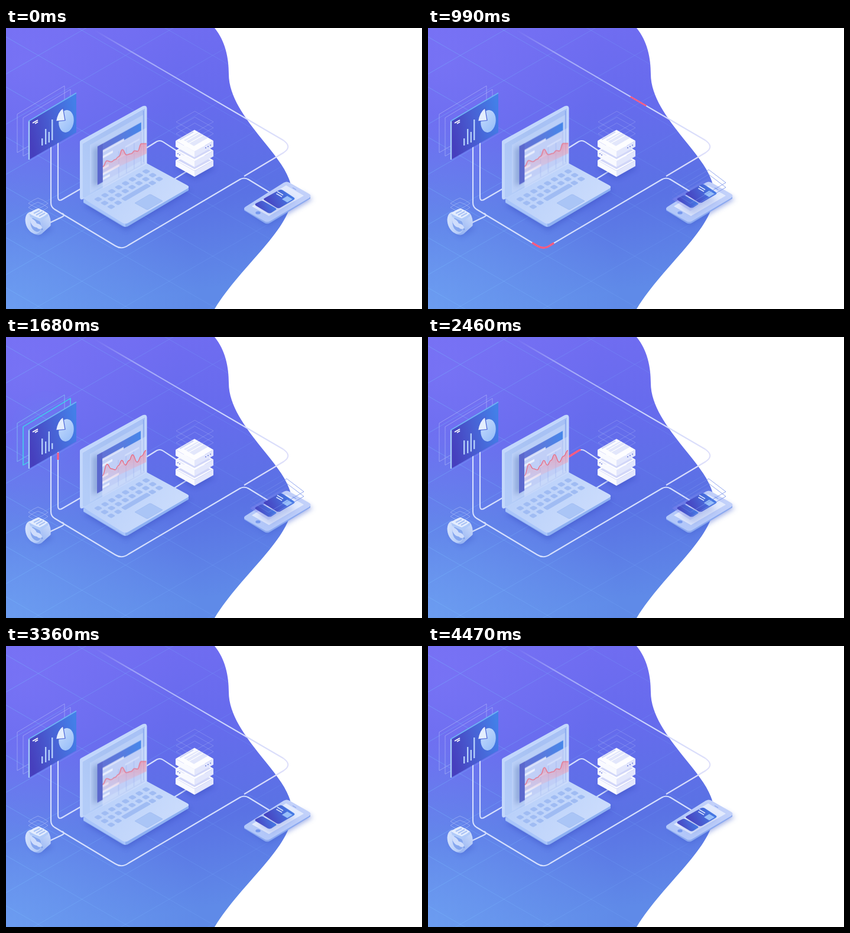
An HTML page for the animation above (4.5 s loop, 704 by 476 pixels).

```html
<!DOCTYPE html>
<html lang="en">
<head>
<meta charset="utf-8">
<title>Connected devices</title>
<style>
html, body { margin: 0; width: 100%; height: 100%; overflow: hidden; background: #fff; }
svg { display: block; width: 704px; height: 476px; }
.wire { fill: none; stroke: #d6e0fd; stroke-width: 2.1; }
.pulse { fill: none; stroke: #fb5b82; stroke-width: 3.4; }
.ghost { fill: none; stroke: #cfdcff; stroke-width: .9; stroke-opacity: .45; }
.cyan { fill: none; stroke: #2fdfe8; stroke-width: 1.3; }
.pulse, .lit, .lift, .rise, .bar, .float { animation: 4.5s linear infinite; }

.main { stroke-dasharray: 41 2000; animation-name: main; }
@keyframes main { 0%, 10.18% { stroke-dashoffset: 41; } 31.64%, 100% { stroke-dashoffset: -523; } }
.far { stroke-width: 2.6; animation-name: far; }
@keyframes far {
  0%, 13.8% { stroke-dasharray: 0 2000; stroke-dashoffset: 0; opacity: 0; }
  14% { opacity: 1; }
  15.33% { stroke-dasharray: 18 2000; stroke-dashoffset: -9; }
  24% { stroke-dasharray: 35 2000; stroke-dashoffset: -285; opacity: 1; }
  28% { stroke-dasharray: 34 2000; stroke-dashoffset: -319; opacity: .6; }
  32%, 100% { stroke-dasharray: 30 2000; stroke-dashoffset: -345; opacity: 0; }
}
.down { stroke-dasharray: 40 2000; animation-name: down; }
@keyframes down { 0%, 36.9% { stroke-dashoffset: 40; } 43.7%, 100% { stroke-dashoffset: -139; } }
.serve { stroke-dasharray: 40 2000; animation-name: serve; }
@keyframes serve { 0%, 53.8% { stroke-dashoffset: 40; } 57.8%, 100% { stroke-dashoffset: -66; } }

.early { animation-name: early; }
@keyframes early { 0%, 23.5% { opacity: 0; } 27.5%, 29% { opacity: 1; } 35.5%, 100% { opacity: 0; } }
.near { animation-name: near; }
@keyframes near { 0%, 32% { opacity: 0; } 35%, 37% { opacity: 1; } 44%, 100% { opacity: 0; } }
.halo { animation-name: halo; }
@keyframes halo { 0%, 36.5% { opacity: 0; } 41%, 43% { opacity: 1; } 48%, 100% { opacity: 0; } }
.late { animation-name: late; }
@keyframes late { 0%, 56% { opacity: 0; } 60%, 62% { opacity: 1; } 69%, 100% { opacity: 0; } }

.lift { animation-name: lift; animation-timing-function: ease-in-out; }
@keyframes lift {
  0%, .7% { transform: none; }
  20%, 60% { transform: translateY(-9px); }
  88%, 100% { transform: none; }
}
.rise { animation-name: rise; }
@keyframes rise {
  0%, 5% { opacity: 0; transform: translateY(18px); }
  15.33% { opacity: 1; transform: translateY(4px); }
  22%, 60% { opacity: 1; transform: none; }
  74%, 100% { opacity: 0; transform: translateY(16px); }
}
.bar { fill: #b4d0fb; transform-box: fill-box; transform-origin: bottom; animation-name: bar; animation-timing-function: ease-in-out; }
@keyframes bar { 0%, 29% { transform: none; } 37%, 48.5% { transform: scaleY(var(--s)); } 68%, 100% { transform: none; } }
.float { animation-name: float; animation-timing-function: ease-in-out; }
@keyframes float { 0%, 100% { transform: translate(.8px, .8px); } 46% { transform: none; } }
</style>
</head>
<body>
<svg viewBox="0 0 704 476" xmlns="http://www.w3.org/2000/svg">
<defs>
  <linearGradient id="sky" x1=".1" y1="0" x2=".25" y2="1">
    <stop stop-color="#726df2"/><stop offset=".35" stop-color="#666bed"/><stop offset=".68" stop-color="#5a72e4"/><stop offset="1" stop-color="#5f8ae8"/>
  </linearGradient>
  <radialGradient id="sea" gradientUnits="userSpaceOnUse" cx="0" cy="476" r="330">
    <stop stop-color="#6fa2f3" stop-opacity=".8"/><stop offset="1" stop-color="#6fa2f3" stop-opacity="0"/>
  </radialGradient>
  <radialGradient id="dusk" gradientUnits="userSpaceOnUse" cx="30" cy="60" r="260">
    <stop stop-color="#7f78f8" stop-opacity=".5"/><stop offset="1" stop-color="#7f78f8" stop-opacity="0"/>
  </radialGradient>
  <radialGradient id="glow">
    <stop stop-color="#1fdfe2" stop-opacity=".55"/><stop offset=".5" stop-color="#2fdce6" stop-opacity=".22"/><stop offset="1" stop-color="#40e0e8" stop-opacity="0"/>
  </radialGradient>
  <linearGradient id="gridInk" gradientUnits="userSpaceOnUse" x1="0" y1="0" x2="480" y2="0">
    <stop stop-color="#78bcff" stop-opacity=".4"/><stop offset="1" stop-color="#78a8ff" stop-opacity=".14"/>
  </linearGradient>
  <linearGradient id="trail" gradientUnits="userSpaceOnUse" x1="150" y1="0" x2="478" y2="0">
    <stop stop-color="#c9d4ff" stop-opacity="0"/><stop offset=".2" stop-color="#c9d4ff" stop-opacity=".5"/><stop offset=".7" stop-color="#d0d9fd"/><stop offset="1" stop-color="#dedffa"/>
  </linearGradient>
  <linearGradient id="deep" x1="0" y1=".6" x2="1" y2=".3">
    <stop stop-color="#463fbd"/><stop offset=".5" stop-color="#4861d4"/><stop offset="1" stop-color="#437fe8"/>
  </linearGradient>
  <linearGradient id="lid" x1="0" y1=".8" x2="1" y2="0">
    <stop stop-color="#b3ccf8"/><stop offset=".5" stop-color="#a8c2f3"/><stop offset="1" stop-color="#a8c1f6"/>
  </linearGradient>
  <linearGradient id="deck" x1="0" y1="0" x2="1" y2=".4">
    <stop stop-color="#b4cdf9"/><stop offset="1" stop-color="#cbdcfc"/>
  </linearGradient>
  <linearGradient id="head">
    <stop stop-color="#6470d4"/><stop offset=".5" stop-color="#5b7add"/><stop offset="1" stop-color="#4787ea"/>
  </linearGradient>
  <linearGradient id="heat" x1="0" y1="0" x2="0" y2="1">
    <stop stop-color="#f58598" stop-opacity=".62"/><stop offset="1" stop-color="#f3b0c4" stop-opacity=".1"/>
  </linearGradient>
  <linearGradient id="pie" x1="0" y1="0" x2="1" y2="1">
    <stop stop-color="#c6dcfd"/><stop offset="1" stop-color="#94bbf8"/>
  </linearGradient>
  <linearGradient id="pale" x1="0" y1="0" x2="1" y2="1">
    <stop stop-color="#dde8fe"/><stop offset="1" stop-color="#a3bff6"/>
  </linearGradient>
  <linearGradient id="strap" x1="1" y1="0" x2=".2" y2="1">
    <stop stop-color="#d0dffc"/><stop offset="1" stop-color="#8dadf1"/>
  </linearGradient>
  <linearGradient id="phone" x1="0" y1="1" x2="1" y2="0">
    <stop stop-color="#aec5f9"/><stop offset="1" stop-color="#c6d3fa"/>
  </linearGradient>
  <linearGradient id="sheet">
    <stop stop-color="#8684ef" stop-opacity=".45"/><stop offset=".7" stop-color="#a9aef6" stop-opacity=".05"/>
  </linearGradient>
  <linearGradient id="edge">
    <stop stop-color="#91a5f5" stop-opacity=".1"/><stop offset=".7" stop-color="#6f8bea" stop-opacity=".75"/><stop offset="1" stop-color="#6f8bea" stop-opacity=".8"/>
  </linearGradient>
  <filter id="soft" x="-30%" y="-30%" width="160%" height="160%"><feGaussianBlur stdDeviation="4"/></filter>
  <clipPath id="wave"><path id="shore" d="M0 0H353C371 22 377 50 377 78C377 116 405 153 432 187C460 222 484 249 484 282C484 340 400 400 353 476H0Z"/></clipPath>
  <path id="slab" d="M39 158L119 110V177L39 223Z"/>
  <path id="tile" d="M288 190L319.500 172L351 190L319.500 208Z"/>
  <path id="dial" d="M38 297Q46 291 54 288Q63 291 71 297Q64 302 55 306Q46 302 38 297Z"/>
  <path id="screen" d="M413 277L475 240L504 262L444 297Z"/>
  <g id="unit">
    <path fill="#f9faff" d="M287 191L319 209V219L287 201Z"/>
    <path fill="#e3e7fc" d="M351 191L319 209V219L351 201Z"/>
    <path fill="#fdfdff" d="M287 191L319 172.500L351 191L319 209Z"/>
  </g>
</defs>

<use href="#shore" fill="url(#sky)"/>
<g clip-path="url(#wave)">
  <path fill="url(#sea)" d="M0 0H500V476H0Z"/>
  <path fill="url(#dusk)" d="M0 0H500V476H0Z"/>
  <path id="grid" fill="none" stroke="url(#gridInk)"/>
</g>

<!-- wiring -->
<path class="wire" style="stroke:url(#trail)" d="M150 4L469 190Q485 201 470 211L403 251"/>
<path class="wire" d="M447 279L411 257Q403 252 395 257L207 368Q196 376 185 369L82 307Q76 303 76 296V200M74 330L95 320Q101 317 95 314M88 194V286Q88 295 96 290L127 272M238 203L254 193Q260 189 266 193L292 210M283 257L309 241"/>
<path class="pulse far" d="M402 253L470 211Q485 201 469 190L150 4"/>
<path class="pulse main" d="M447 279L411 257Q403 252 395 257L207 368Q196 376 185 369L82 307Q76 303 76 296V208"/>
<path class="pulse down" d="M88 196V286Q88 295 96 290L125 273"/>
<path class="pulse serve" d="M238 203L254 193Q260 189 266 193L290 209"/>

<!-- dashboard -->
<ellipse class="lit halo" cx="68" cy="158" rx="63" ry="70" fill="url(#glow)" opacity="0"/>
<g class="ghost"><use href="#slab" x="-10" y="-6"/><use href="#slab" x="-20" y="-12"/></g>
<g class="cyan"><use class="lit near" href="#slab" x="-10" y="-6"/><use class="lit halo" href="#slab" x="-20" y="-12"/></g>
<use href="#slab" fill="url(#deep)"/>
<path fill="none" stroke="#a6cdfa" stroke-width="2.400" d="M39 223V158"/>
<path fill="none" stroke="#6fb4f4" stroke-width="1.800" d="M38 158L119 110"/>
<path stroke="#fff" stroke-width="1.800" d="M45 161L54 156M49 162L54 159"/>
<g id="bars"></g>
<ellipse cx="102" cy="158" rx="12.600" ry="19" transform="rotate(8 102 158)" fill="url(#pie)"/>
<path fill="#e4eefe" stroke="#4a63d6" stroke-width="1.200" d="M84.500 158Q87 142 96.500 135.500L100 156.500Z"/>

<!-- watch -->
<ellipse class="lit early" cx="53" cy="296" rx="52" ry="50" fill="url(#glow)" opacity="0"/>
<g class="ghost"><use href="#dial"/><use href="#dial" y="7"/></g>
<g class="cyan lit early"><use href="#dial"/><use href="#dial" y="7"/></g>
<path fill="#3c58c8" opacity=".35" filter="url(#soft)" d="M36 335L55 355L78 342L70 330Z"/>
<path fill="url(#strap)" d="M48 318L71 314Q77 322 75.500 335L60 349Q54 353 46 348Z"/>
<ellipse cx="46.500" cy="330" rx="13" ry="19.500" transform="rotate(-20 46.500 330)" fill="url(#pale)"/>
<ellipse cx="50.500" cy="333" rx="8.500" ry="12.500" transform="rotate(-20 50.500 333)" fill="#86a7ef"/>
<path fill="#cfddfc" d="M41 322Q49 324 52 331Q60 332 61 339Q57 343 52 338Q45 337 42 330Z"/>
<path fill="#b0caf9" d="M39 314L57 323L71 314V319L58 328L41 320Z"/>
<path fill="#e4edfe" d="M39 314Q46 308 55 305.500Q64 309 71 314Q65 319 57 322.500Q47 319 39 314Z"/>
<path stroke="#a9c2f5" stroke-width="2" d="M47 314L57 309M51 317L62 311M56 319L66 313.500"/>
<circle cx="61" cy="341" r="1.400" fill="#7e9fe8"/>

<!-- laptop -->
<path fill="#3449bd" opacity=".4" filter="url(#soft)" d="M131 300L203 343L312 277L290 262Z"/>
<path fill="#8eb0f2" d="M131 290V296L196 335Q202 339 208 335L309 275V268Z"/>
<path fill="#a9c5fa" d="M131 290V295L197 334Q200 336 202 337V320Z"/>
<path fill="url(#deck)" d="M131 289L238 229L306 266Q312 269 307 272L207 330Q202 333 197 330Z"/>
<g id="keys" transform="matrix(1 -.58 1 .58 156 290)" fill="#a0bcf3"></g>
<path fill="#aac5f6" stroke="#9dbaf1" stroke-width=".8" d="M218 296.500L242 282.500Q244 281.500 246 282.500L265 293L241 307Q239 308 237 307Z"/>
<path fill="#c2d7fc" d="M125 193Q125 191 127 190L231 132.500Q238 130 238.500 136V230L130 290Q125 292 125 286Z"/>
<path fill="url(#lid)" d="M129 196L235 136V230L134 287Q129 289 129 284Z"/>
<path fill="none" stroke="#cadcfd" d="M129 287V196L236 135"/>
<path fill="#c0d4f9" opacity=".7" d="M142 198L232 147V229L142 280Z"/>
<path stroke="#7fa0ec" d="M232.500 140V227"/>
<g class="float">
  <path fill="#5f7cba" opacity=".5" filter="url(#soft)" d="M147 204L158 198V262L147 268Z"/>
  <g transform="matrix(1 -.555 0 1 154 200)">
    <path fill="#a9bcf2" opacity=".9" d="M0 0H74V65H0Z"/>
    <path fill="url(#head)" d="M0 0H74V14H0Z"/>
    <path fill="#5b68cd" d="M0 0H9V65H0Z"/>
  </g>
  <g transform="matrix(1 -.555 0 1 163 205)">
    <path fill="#dbe5fd" opacity=".45" d="M0 4H74V66H0Z"/>
    <path stroke="#8fa9ee" stroke-width=".7" opacity=".6" d="M27 18V62M40 18V62M53 18V62M65 6V62"/>
    <path stroke="#f3f6ff" stroke-width="4" opacity=".8" d="M0 3H36M0 13H17M0 32H10M0 42H28M0 50H12"/>
    <path stroke="#e9effe" stroke-width="3" opacity=".45" d="M38 17H62M24 29H38"/>
  </g>
  <path id="area" fill="url(#heat)"/>
  <path id="line" fill="none" stroke="#ee5c70" stroke-width="1.100"/>
</g>

<!-- servers -->
<ellipse class="lit late" cx="319" cy="180" rx="58" ry="70" fill="url(#glow)" opacity="0"/>
<path fill="#3449bd" opacity=".45" filter="url(#soft)" d="M287 236L319 256L354 238L319 222Z"/>
<use href="#unit" y="33"/>
<path fill="#8f9bee" opacity=".4" d="M291 224L319 239L347 224L319 213Z"/>
<use href="#unit" y="16.500"/>
<path fill="#8f9bee" opacity=".4" d="M291 207L319 222L347 207L319 196Z"/>
<use href="#unit"/>
<path fill="#e3e7fb" d="M301 190L325 176.500L342 186L318 200Z"/>
<path stroke="#fff" stroke-width="1.400" d="M304 192L328 178M310 195L333 182"/>
<path stroke="#d2d9f8" stroke-width="2.500" d="M294 189L317 176"/>
<g fill="#6a78d8"><circle cx="338" cy="203" r="1"/><circle cx="342" cy="200.700" r="1"/><circle cx="346" cy="198.400" r="1"/><circle cx="291" cy="213" r="1"/><circle cx="294" cy="215" r="1"/></g>
<g class="ghost" opacity=".6"><use href="#tile" y="-11"/><use href="#tile" y="-21"/><use href="#tile" y="-31"/></g>
<g class="cyan lit late"><use href="#tile" y="-11"/><use href="#tile" y="-21"/><use href="#tile" y="-31"/></g>

<!-- phone -->
<g opacity=".6"><ellipse class="lit early" cx="468" cy="272" rx="68" ry="64" fill="url(#glow)" opacity="0"/></g>
<path fill="#4260cf" opacity=".5" filter="url(#soft)" d="M408 311L442 335L519 290L500 278Z"/>
<path fill="#8ba9f0" d="M403 305V309L437 330Q442 333 447 330L515 289V284Z"/>
<path fill="url(#phone)" d="M405 303L470 262Q475 259 480 262L513 281Q518 284 513 288L447 327Q442 330 437 327L405 309Q401 306 405 303Z"/>
<path fill="#e2eafd" d="M416 302L474 266.500L504 284L445 318.500Z"/>
<ellipse cx="426.500" cy="313" rx="4.200" ry="2.600" fill="#7799ee"/>
<path stroke="#8fa8ee" stroke-width="1.400" d="M485 270.500L491 274"/>
<g class="rise"><use href="#screen" y="13" fill="url(#sheet)"/></g>
<path fill="#6b83d9" opacity=".3" filter="url(#soft)" d="M426 302L464 280L490 292L448 317Z"/>
<g class="lift">
  <path fill="url(#deep)" d="M438 288L462 274.500Q465 273 468 274.500L487 287Q490 289 487 291L464 304.500Q461 306 458 304.500L438 292Q434 290 438 288Z"/>
  <path fill="#98bff9" d="M467 290L476 284.500L485 290L476 295.500Z"/>
  <path stroke="#d5e3fd" stroke-width="1.600" d="M459 277L469 283M457.500 280.500L467 286"/>
  <path fill="url(#deep)" d="M423 297L431 293Q433 292 435 293L456 305Q459 307 456 308.500L449 313Q446 314.500 443 313L423 301Q420 299 423 297Z"/>
</g>
<g class="rise" fill="none" stroke="url(#edge)">
  <use href="#screen"/><use href="#screen" y="8"/>
</g>
<g class="lit early">
  <use href="#screen" y="8" fill="#39cfe0" opacity=".22"/>
  <g class="cyan"><use href="#screen"/><use href="#screen" y="8"/></g>
</g>
</svg>
<script>
const $ = id => document.getElementById(id);
const rect = (x, y, w, h, more = '') => `<rect x="${x}" y="${y}" width="${w}" height="${h}" ${more}/>`;

// isometric floor grid
let grid = '';
for (let k = -240; k < 480; k += 85) grid += `M0 ${k}l500 288`;
for (let k = 78; k < 780; k += 85) grid += `M0 ${k}l500 -288`;
$('grid').setAttribute('d', grid);

// bars: x, base, height, scale at the peak
$('bars').innerHTML = [[60, 199, 12, 2.25], [66, 197, 26, .77], [71.6, 194, 18, 1.89], [77, 190, 35, .29]]
  .map(([x, y, h, s]) => rect(x, y - h, 2.4, h, `class="bar" style="--s:${s}"`)).join('');

// keyboard: three rows and a space bar
let keys = '';
for (let row = 0; row < 3; row++)
  for (let i = 0; i < 8; i++)
    if (row < 2 || i < 2 || i > 5) keys += rect(i * 11.6 - 3.7, row * 11 - 3.7, 7.4, 7.4, 'rx="1.8"');
$('keys').innerHTML = keys + rect(20, 18.3, 44, 7.4, 'rx="1.8"');

// chart curve swaying between two shapes
const low = [[163, 234], [170, 224], [177, 226], [184, 222], [190, 217], [196, 205], [203, 214], [211, 212], [217, 207], [222, 208], [228, 195], [237, 195]];
const high = [[163, 235], [171, 215], [178, 223], [185, 225], [190, 218], [196, 209], [202, 217], [208, 209], [214, 199], [222, 212], [229, 202], [237, 192]];
const curve = pts => pts.slice(1).reduce((d, [x, y], i) => {
  const [px, py] = pts[i], m = (px + x) / 2;
  return `${d}C${m} ${py} ${m} ${y} ${x} ${y}`;
}, `M${pts[0]}`);
const sway = (id, tail) => {
  const [a, b] = [low, high].map(p => ({ d: `path("${curve(p)}${tail}")`, easing: 'ease-in-out' }));
  $(id).animate([a, { ...a, offset: .22 }, { ...b, offset: .4 }, { ...b, offset: .54 }, { ...a, offset: .76 }, a],
    { duration: 4500, iterations: Infinity });
};
sway('line', '');
sway('area', 'L237 212L163 247Z');
</script>
</body>
</html>
```
